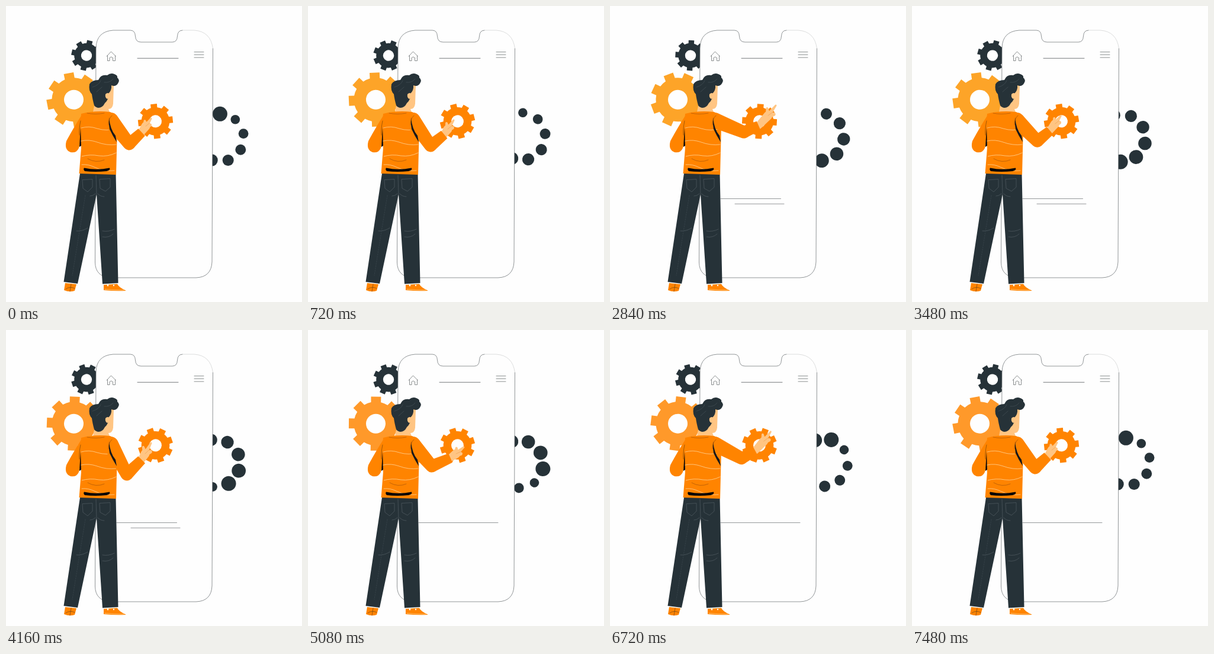
These frames come from a looping animation (500 by 500 pixels, 7.72 s). An HTML page with a canvas:

```html
<!DOCTYPE html>
<html lang="en">
<head>
<meta charset="utf-8">
<title>App settings</title>
<style>
html, body { margin: 0; width: 100%; height: 100%; overflow: hidden; background: #fefefe; }
canvas { display: block; width: 100%; height: 100%; }
</style>
</head>
<body>
<canvas id="stage"></canvas>
<script>
const canvas = document.getElementById('stage');
const ctx = canvas.getContext('2d');
const dpr = window.devicePixelRatio || 1;
canvas.width = canvas.height = 500 * dpr;

const LOOP = 7720, STEP = 40, LAST = 7480;
const SPIN = 7075, REACH = 3660;
const TAU = Math.PI * 2, DEG = Math.PI / 180;
const DARK = '#263238', ORANGE = '#ff8400', SKIN = '#ffc583', WHITE = '#fefefe', CREAM = '#ffd49a';

// Arm poses: phase, elbow, wrist, palm, fingertip
const POSES = [
  [0, 208, 233, 229, 213, 236, 203, 245, 190],
  [0.137, 204, 244, 229, 219, 235, 209, 245, 191],
  [0.197, 207, 236, 230, 217, 236, 208, 246, 193],
  [0.525, 212, 226, 249, 214, 261, 208, 276, 198],
  [0.628, 224, 220, 258, 206, 270, 197, 287, 181],
  [0.776, 226, 213, 251, 202, 267, 185, 280, 168]
];

function fill(d, color) {
  ctx.fillStyle = color;
  ctx.fill(new Path2D(d));
}

function line(d, color, width = 0.7) {
  ctx.strokeStyle = color;
  ctx.lineWidth = width;
  ctx.stroke(new Path2D(d));
}

function disc(x, y, r, color) {
  ctx.fillStyle = color;
  ctx.beginPath();
  ctx.arc(x, y, r, 0, TAU);
  ctx.fill();
}

// Capsule with a different radius at each end
function limb(x1, y1, r1, x2, y2, r2, color) {
  const a = Math.atan2(y2 - y1, x2 - x1);
  const b = Math.acos((r1 - r2) / Math.hypot(x2 - x1, y2 - y1));
  ctx.fillStyle = color;
  ctx.beginPath();
  ctx.arc(x1, y1, r1, a + b, a - b + TAU);
  ctx.arc(x2, y2, r2, a - b, a + b);
  ctx.fill();
}

function gear(x, y, size, hole, angle, color) {
  ctx.save();
  ctx.translate(x, y);
  ctx.rotate(angle * DEG);
  ctx.fillStyle = color;
  ctx.beginPath();
  for (let i = 0; i < 8; i++) {
    const mid = i * 45;
    for (const [off, r] of [[-13, 0.8], [-10.5, 1], [10.5, 1], [13, 0.8]]) {
      const a = (mid + off) * DEG;
      ctx.lineTo(Math.cos(a) * size * r, Math.sin(a) * size * r);
    }
    ctx.arc(0, 0, size * 0.8, (mid + 13) * DEG, (mid + 32) * DEG);
  }
  ctx.closePath();
  ctx.fill();
  disc(0, 0, hole, WHITE);
  ctx.restore();
}

function loader(turn) {
  ctx.save();
  ctx.translate(357.8, 222.9);
  ctx.rotate(-turn * TAU);
  for (let i = 0; i < 9; i++) {
    const a = (i * 40 - 90) * DEG;
    const r = i ? 7.8 + 0.58 * (i - 1) : 12.5;
    disc(3.6 + Math.cos(a) * 40.3, -0.3 + Math.sin(a) * 40.3, r, DARK);
  }
  ctx.restore();
}

function phone(t) {
  const d = 'M152 70Q153 43 181 41H210Q218 41 218.5 51Q219 61 228 61H281Q289 61 289.5 51Q290 41 298 41';
  const rest = 'H320Q349 43 349.5 72L348 432Q347 458 321 459H176Q151 457 150.5 433Z';
  fill(d + rest, WHITE);
  line(d, '#62676a');
  line('M298 41H318Q346 43 349.5 72', '#c4c6c7', 0.6);
  line('M349.5 72L348 432Q347 458 321 459H176Q151 457 150.5 433L152 70', '#62676a');
  line('M222 88.3H291', '#777b7d', 1);
  line('M170 85L177.5 77L185.5 85M171.5 84V92.5H175V87.5Q177.5 84.5 180.5 87.5V92.5H184.5V84', '#6c7173', 0.8);
  line('M318 77.7H334M318 82.3H334M318 87H334', '#6c7173', 0.8);

  if (t >= 840) line('M187 325.5H' + (t < 4840 ? 288.5 : 321), '#8b8e90', 0.9);
  if (t >= 840 && t < 4840) line('M211 334.3H' + (t < 2440 ? 285.5 : 294), '#8b8e90', 0.9);
}

function legs() {
  fill('M125 283L97.5 466L121 469L153 318L163 469.5L189.5 468L185.5 283Z', DARK);
  const seam = '#59646a';
  line('M152 286L153 318M129 294L130 308L138 314L146 306V293ZM158 293L159 308L168 313L176 306V292Z', seam, 0.6);
  line('M155 317Q159 322 166 322M151 317Q147 321 142 321M119 380Q128 381 138 375M163 380Q173 382 183 377M163 390Q174 392 181 385', seam, 0.6);
  ctx.setLineDash([2, 2]);
  line('M134 320L112 455', '#3f4b51', 0.6);
  ctx.setLineDash([]);
  fill('M100 468L119 470L116 481Q107 484 98 480Z', ORANGE);
  line('M110 470L108 482M101 478Q108 473 116 477', '#5a3b1c', 0.6);
  fill('M165 471L188 469.5Q190 475 203 481Q184 482 165 480Z', ORANGE);
  line('M167 478.5Q182 480 199 480', CREAM, 0.7);
  disc(172, 472, 1.4, WHITE);
  disc(182, 472, 1.2, WHITE);
}

function head() {
  fill('M150 163L147 179Q160 184 175 179L173 174Q180 174 181 165L182 134Q172 130 164 136Z', SKIN);
  fill('M149 168Q146 157 145 149Q139 143 141 132Q145 125 156 125Q160 115 171 117Q177 112 183 115Q189 117 188 121' +
    'Q193 125 189 131Q185 137 178 134Q179 142 173 148Q174 158 167 164Q163 172 156 172Q151 171 149 168Z', DARK);
  fill('M168 149Q172 145 175 149Q177 154 171 157Q167 155 168 149Z', SKIN);
  line('M146 137Q157 134 160 126M166 129Q176 130 181 123M153 145L162 137', '#48555b', 0.6);
}

function torso() {
  fill('M128 184Q115 204 102 228Q98 243 109 247Q119 249 123 240L130 214Z', ORANGE);
  fill('M127 182Q150 176 176 179Q187 184 188 203L186 285L123.5 283L127 240L125 208Z', ORANGE);
  fill('M126 205L124 238L127 236Z', '#080706');
  line('M126 194Q123 208 124 218', '#643b0c', 0.6);
  line('M127 206Q140 202 154 207Q170 212 186 207M127 228Q140 225 154 230Q170 236 186 234M128 254Q142 250 157 253Q172 255 186 248M128 268Q139 267 149 272Q166 280 183 278', CREAM, 0.8);
  line('M137 181Q151 184 166 181M138 258Q152 266 166 260', '#a8550a', 0.7);
  fill('M132 273.5Q153 278 175 273.5Q177 277 170 279Q151 281 133 279Q130 276 132 273.5Z', '#080706');
}

function armPose(phase) {
  const n = POSES.length;
  const at = i => {
    const p = POSES[(i + n) % n].slice();
    p[0] += Math.floor(i / n);
    return p;
  };
  let i = n - 1;
  while (POSES[i][0] > phase) i--;
  const [a, b, c, d] = [at(i - 1), at(i), at(i + 1), at(i + 2)];
  const h = c[0] - b[0], u = (phase - b[0]) / h, v = 1 - u;
  return b.slice(1).map((p, k) => {
    const q = c[k + 1];
    const m = (q - a[k + 1]) / (c[0] - a[0]) * h;
    const w = (d[k + 1] - p) / (d[0] - b[0]) * h;
    return v * v * (1 + 2 * u) * p + u * v * v * m + u * u * (3 - 2 * u) * q - u * u * v * w;
  });
}

function arm(phase) {
  const [ex, ey, wx, wy, hx, hy, fx, fy] = armPose(phase);
  const dx = fx - hx, dy = fy - hy;
  limb(wx, wy, 6, hx, hy, 7.5, SKIN);
  limb(hx, hy, 4, fx, fy, 1.5, SKIN);
  // Thumb and curled fingers beside the pointing finger
  limb(hx, hy, 4, hx + dx * 0.4 + dy * 0.4, hy + dy * 0.4 - dx * 0.4, 2, SKIN);
  limb(hx, hy, 5, hx + dx * 0.35 - dy * 0.3, hy + dy * 0.35 + dx * 0.3, 3, SKIN);
  line(`M${hx} ${hy}L${hx + dx * 0.5 - dy * 0.15} ${hy + dy * 0.5 + dx * 0.15}`, '#e99b50', 0.6);

  limb(177, 193, 13, ex, ey, 10.5, ORANGE);
  // Flat cuff at the wrist
  const a = Math.atan2(wy - ey, wx - ex), s = Math.sin(a), c = Math.cos(a);
  ctx.beginPath();
  ctx.moveTo(ex + s * 10.5, ey - c * 10.5);
  ctx.lineTo(wx + s * 8, wy - c * 8);
  ctx.lineTo(wx - s * 8.5, wy + c * 8.5);
  ctx.lineTo(ex - s * 10.5, ey + c * 10.5);
  ctx.fill();

  fill('M174 188Q173 198 175 208Q180 219 187 230L185 219Q176 209 174 188Z', '#14171a');
  line('M179 185Q173 190 173 201', '#8c480d', 0.6);
}

function draw(t) {
  const turn = Math.min(t / SPIN, 1);
  const angle = turn * 360;
  ctx.setTransform(canvas.width / 500, 0, 0, canvas.height / 500, 0, 0);
  ctx.lineCap = ctx.lineJoin = 'round';
  ctx.fillStyle = WHITE;
  ctx.fillRect(0, 0, 500, 500);

  loader(turn);
  gear(136, 83.6, 26, 9.2, 13 - angle, DARK);
  gear(114.5, 158.2, 46.3, 16.5, -11 - angle, t < 4040 ? '#fda428' : '#ff992a');
  phone(t);
  gear(252.5, 194.8, 29.8, 10.5, angle - 6, ORANGE);
  legs();
  head();
  torso();
  arm(t >= 2 * REACH ? 0 : t / REACH % 1);
}

function tick() {
  const t = performance.now() % LOOP;
  draw(Math.min(Math.floor(t / STEP) * STEP, LAST));
  requestAnimationFrame(tick);
}
tick();
</script>
</body>
</html>
```
